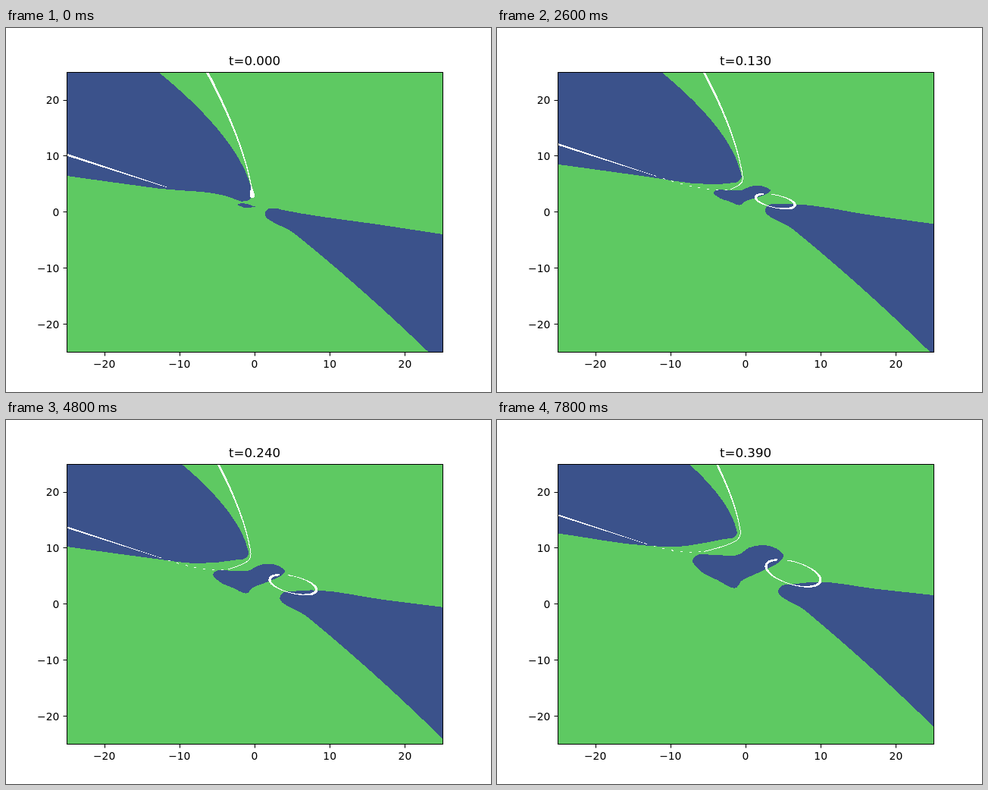
Write an HTML page that moves like this. It is 640 px wide and 480 px high and loops after 8000 ms.

```html
<!DOCTYPE html>
<html lang="en">
<head>
<meta charset="utf-8">
<title>Region plot</title>
<style>
html, body { margin: 0; width: 100%; height: 100%; overflow: hidden; background: #fff; }
svg { display: block; width: 640px; height: 480px; font: 13.89px "DejaVu Sans", sans-serif; }
#plot { shape-rendering: crispEdges; }
</style>
</head>
<body>
<svg viewBox="0 0 640 480">
  <clipPath id="box"><rect x="80" y="58" width="496" height="369"/></clipPath>
  <rect width="640" height="480" fill="#fff"/>
  <g id="plot" clip-path="url(#box)">
    <rect x="80" y="58" width="496" height="369" fill="#5ec962"/>
    <g fill="#3b528b"><path id="upper"/><path id="lower"/><path id="blob"/></g>
    <g fill="#fff"><path id="hook"/><path id="ray"/><path id="ring"/></g>
    <path id="dots" fill="none" stroke="#fff" stroke-dasharray="3 9"/>
  </g>
  <g id="axes" stroke="#000" stroke-width="1.11">
    <rect x="80.5" y="58.5" width="496" height="369" fill="none" shape-rendering="crispEdges" stroke-width="1"/>
  </g>
  <text id="title" x="328" y="49" font-size="16.67" text-anchor="middle"></text>
</svg>
<script>
const $ = id => document.getElementById(id);
const range = (n, f) => Array.from({ length: n + 1 }, (_, i) => f(i / n));

// Smooth curve with chord-length tangents
function curve(pts, closed, start = "M") {
  const n = pts.length;
  const at = i => closed ? pts[(i + n) % n] : pts[Math.max(0, Math.min(n - 1, i))];
  const gap = (p, q) => Math.hypot(q[0] - p[0], q[1] - p[1]) || 1e-6;
  const slope = i => {
    const p = at(i - 1), q = at(i), r = at(i + 1), u = gap(p, q), v = gap(q, r);
    return [0, 1].map(d => {
      if (p === q) return (r[d] - q[d]) / v;
      if (r === q) return (q[d] - p[d]) / u;
      return ((q[d] - p[d]) / u * v + (r[d] - q[d]) / v * u) / (u + v);
    });
  };
  const fix = p => p.map(v => v.toFixed(2)).join();
  let out = start + fix(pts[0]);
  for (let i = 0; i < (closed ? n : n - 1); i++) {
    const p = at(i), q = at(i + 1), h = gap(p, q) / 3, m = slope(i), k = slope(i + 1);
    out += "C" + [[p[0] + m[0] * h, p[1] + m[1] * h], [q[0] - k[0] * h, q[1] - k[1] * h], q].map(fix).join(" ");
  }
  return out + (closed ? "Z" : "");
}

// Band along a centre line; width(u) runs over u = 0..1
function ribbon(pts, width) {
  const last = pts.length - 1;
  const side = sign => pts.map((p, i) => {
    const a = pts[Math.max(0, i - 1)], b = pts[Math.min(last, i + 1)];
    const dx = b[0] - a[0], dy = b[1] - a[1];
    const r = sign * width(i / last) / 2 / (Math.hypot(dx, dy) || 1);
    return [p[0] - dy * r, p[1] + dx * r];
  });
  return curve(side(1)) + curve(side(-1).reverse(), false, "L") + "Z";
}

// Power curve falling from height "top" to its tip at (x, y)
const horn = (x, y, a, p, top) => range(10, u => {
  const rise = (y - top) * (1 - u);
  return [x - a * rise ** p, y - rise];
});

function upper(t) {
  const x = 325 - 22 * t, y = 222 - 184 * t;
  return curve([
    ...horn(x, y, 0.032 + 0.024 * t, 1.62, 58),
    [x - 4, y + 4.5], [x - 15, y + 6.5],
    [298 - 100 * Math.sqrt(t), 224 - 146 * t],
    [200, 211.5 - 117 * t], [80, 195 - 117 * t]
  ]) + "L80,58Z";
}

// A rising parabola, cut off at a tip that backs away along it
function lower(t) {
  const under = x => [x, 243 + 0.77 * (x - 345) + 0.00046 * (x - 345) ** 2 - 105 * t];
  const over = x => [x, 272 - 105 * t + (0.152 - 0.11 * t) * (x - 576)];
  const x = 343 + 62 * t ** 0.81, y = under(x)[1], g = 0.6 + t;
  return curve([
    ...range(8, u => under(640 + (x - 640) * u)),
    [x + 4 * g, y - 4.5 * g], [x + 18 * g, y - 6.5 * g],
    over(x + 22 + 60 * t), over(500), over(640)
  ]) + "Z";
}

// Unit outline, clockwise from the left end
const lobes = [[0, .35], [.04, .25], [.22, .23], [.52, .21], [.62, .06], [.75, 0], [.92, .08], [1, .26],
  [.95, .4], [.83, .55], [.67, .71], [.53, .87], [.49, 1], [.27, .83], [.07, .58]];

function blob(t) {
  const left = 306 - 100 * t ** 0.78, right = 352.5 + 66 * t;
  const top = 229.5 - 165 * t, bottom = 239 - 48 * t;
  const pinch = Math.exp(-40 * t);
  return curve(lobes.map(([u, v]) => {
    if (u > 0.45) v += (0.65 - v) * pinch;
    return [left + (right - left) * u, top + (bottom - top) * v];
  }), true);
}

// Slanted ellipse with a gap on its upper side
function ring(t) {
  const s = Math.sqrt(t), rad = Math.PI / 180;
  const left = 322.5 + 52 * s, right = 347 + 128 * s;
  const top = 236 - 133 * t, bottom = 247.5 - 71 * t;
  const angle = u => (55 - 337 * u) * rad;
  const part = (a, b, c) => a + (b - a) * (0.5 - 0.5 * Math.cos(c));
  const pts = range(28, u => [part(left, right, angle(u)), part(top, bottom, angle(u) - 60 * rad)]);
  const scale = Math.min(1, s / 0.28);
  return ribbon(pts, u => scale * (0.9 + 2.4 * Math.cos(angle(u) - 10 * rad) ** 2));
}

function hook(t) {
  const x = 325.5 - 11 * t, y = 224 - 190 * t, k = t / 0.39, r = Math.sqrt(k);
  const tail = [[3, 7], [13, 13], [29, 18.5], [48, 23.5]].map(([a, b]) => [x - a * k, y + b * r]);
  return [...horn(x, y, 0.0345 + 0.02 * t, 1.46, 50), ...tail];
}

const ray = t => {
  const x = 213 - 46 * t, y = 167 - 107 * t;
  return [[80, y], [x, y + 0.325 * (x - 80)]];
};

function axes() {
  let out = "";
  const label = v => String(v).replace("-", "\u2212");
  for (let v = -20; v <= 20; v += 10) {
    const px = 328 + 9.92 * v, py = 242.4 - 7.392 * v;
    const x = Math.round(px) + 0.5, y = Math.round(py) + 0.5;
    out += `<path d="M${x} 427.5v5M80.5 ${y}h-5"/><g stroke="none">` +
      `<text x="${px}" y="448" text-anchor="middle">${label(v)}</text>` +
      `<text x="70.3" y="${Math.round(py + 5.3)}" text-anchor="end">${label(v)}</text></g>`;
  }
  $("axes").insertAdjacentHTML("beforeend", out);
}

function draw(t) {
  const set = (id, d) => $(id).setAttribute("d", d);
  const strand = hook(t), [a, b] = ray(t), w = 1.5 - 1.2 * t;
  const [ex, ey] = strand[strand.length - 1];
  set("upper", upper(t));
  set("lower", lower(t));
  set("blob", blob(t));
  set("ring", ring(t));
  set("hook", ribbon(strand, u => 1 + (2.3 - 2 * t) * Math.max(0, 1 - 1.5 * u)));
  set("ray", `M${a[0]},${a[1] - w}L${b[0]},${b[1] - 0.3}v.6L${a[0]},${a[1] + w}Z`);
  set("dots", t > 0.05 ? `M${b}Q${ex - 35},${ey + 4} ${ex},${ey}` : "");
  $("title").textContent = "t=" + t.toFixed(3);
}

let shown = -1;
const begin = performance.now();
function tick() {
  const step = Math.floor((performance.now() - begin) % 8000 / 200);
  if (step !== shown) draw((shown = step) / 100);
  requestAnimationFrame(tick);
}
axes();
tick();
</script>
</body>
</html>
```
